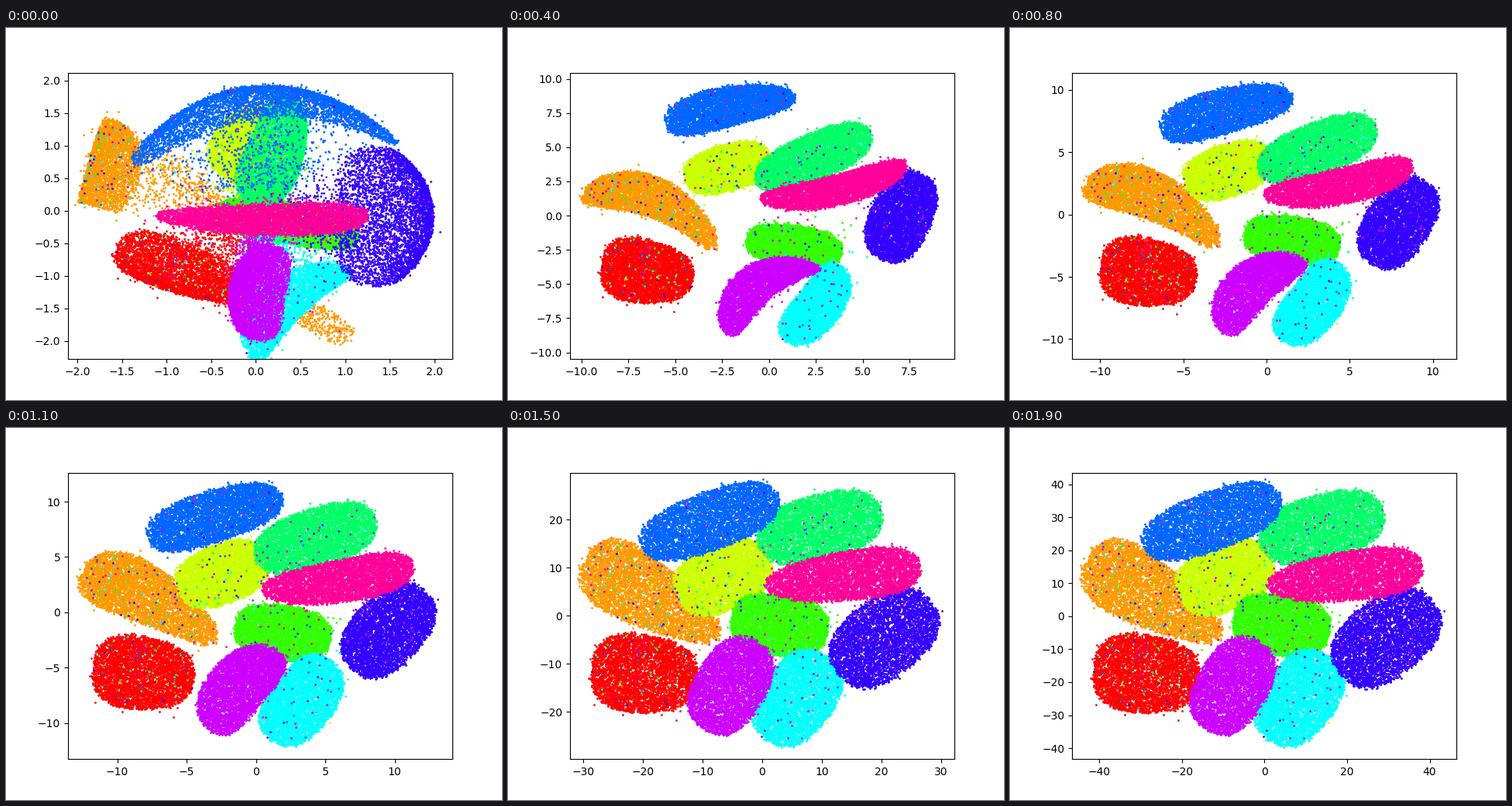
A matplotlib script for the animation above (2 s loop, 640 by 480 pixels).

```python
import colorsys

import matplotlib.pyplot as plt
import numpy as np
from matplotlib.animation import FuncAnimation

FRAMES, STEP = 20, 100
KEYS = np.array([0, 2, 4, 8, 11, 15, 19])
COUNT = 5000
LEFT, TOP, WIDE, HIGH = 80, 57.6, 496, 369.6
MIDDLE = np.array([322, 240])

rng = np.random.default_rng(7)


class Track:
    """Monotone cubic path through values given at KEYS."""

    def __init__(self, values):
        self.v = np.array(values, float).reshape(len(KEYS), -1)
        d = np.diff(self.v, axis=0) / np.diff(KEYS)[:, None]
        a, b = d[:-1], d[1:]
        same = a * b > 0
        mid = np.where(same, 2 * a * b / np.where(same, a + b, 1), 0)
        self.m = np.concatenate([d[:1], mid, d[-1:]])

    def at(self, frame):
        i = min(np.searchsorted(KEYS, frame, "right") - 1, len(KEYS) - 2)
        h = KEYS[i + 1] - KEYS[i]
        u = (frame - KEYS[i]) / h
        return ((1 + 2 * u) * (1 - u) ** 2 * self.v[i]
                + u * (1 - u) ** 2 * h * self.m[i]
                + u * u * (3 - 2 * u) * self.v[i + 1]
                + u * u * (u - 1) * h * self.m[i + 1])


class Pose:
    """Rotated oval on the stage that can bend and taper along its length."""

    def __init__(self, x, y, length, width, angle, bend=0, taper=0):
        self.center = np.array([x, y])
        self.length, self.width = length, width
        self.angle = np.radians(angle)
        self.bend, self.taper = bend, taper

    def place(self, u, v):
        a = self.length * u
        b = self.width * v * (1 + self.taper * u) + self.bend * u ** 2
        c, s = np.cos(self.angle), np.sin(self.angle)
        return self.center + np.column_stack([a * c - b * s, a * s + b * c])


def disc(n, taper=0):
    """Even points in a slightly squared disc, denser at the wider end."""
    u, v = rng.uniform(-1, 1, (2, 4 * n + 40))
    inside = np.abs(u) ** 2.5 + np.abs(v) ** 2.5 < 1
    even = rng.random(len(u)) * (1 + abs(taper)) < 1 + taper * u
    keep = np.flatnonzero(inside & even)[:n]
    return u[keep], v[keep]


class Cluster:
    def __init__(self, start, early, final, lobe=None):
        self.start, self.early, self.final, self.lobe = start, early, final, lobe

    def points(self, n):
        u, v = disc(n, self.final.taper)
        # The first cloud is packed against its outer rim
        pull = 1 + np.hypot(*(self.start.center - MIDDLE)) / 150
        first = self.start.place(u, 1 - 2 * ((1 - v) / 2) ** pull)
        if self.lobe:
            tail = u > 0.7
            first[tail] = self.lobe.place(*disc(tail.sum()))
        loose = (rng.random(n) < 0.13)[:, None]
        inward = rng.uniform(0, 0.75, (n, 1)) * (MIDDLE - first)
        first += loose * (inward + rng.normal(0, 8, (n, 2)))
        return np.stack([first, self.early.place(u, v), self.final.place(u, v)])


red = Cluster(Pose(230, 310, 92, 32, 20, -8, -0.2),
              Pose(181, 313, 56, 36, 10, 0, -0.2),
              Pose(176, 317, 69, 50, 5, 0, -0.1))
orange = Cluster(Pose(138, 188, 67, 33, 106),
                 Pose(194, 220, 90, 19, 18, 42),
                 Pose(186, 218, 100, 42, 31, 0, -0.4),
                 lobe=Pose(408, 380, 44, 18, 28))
yellow = Cluster(Pose(300, 145, 52, 32, -65, 0, -0.3),
                 Pose(285, 175, 54, 24, -12),
                 Pose(277, 192, 64, 43, -24))
green = Cluster(Pose(362, 250, 95, 27, 10),
                Pose(377, 293, 62, 21, 8),
                Pose(350, 254, 63, 40, 8))
spring = Cluster(Pose(347, 158, 74, 36, -70, -15, -0.2),
                 Pose(390, 183, 80, 25, -27),
                 Pose(402, 128, 82, 42, -15))
cyan = Cluster(Pose(362, 345, 85, 30, -37, 15, -0.4),
               Pose(411, 364, 57, 22, -53, -10),
               Pose(372, 348, 66, 47, -52))
blue = Cluster(Pose(328, 95, 172, -20, -5, 75, -0.3),
               Pose(297, 92, 82, -20, -8, 8, -0.4),
               Pose(260, 120, 94, -37, -20))
indigo = Cluster(Pose(490, 243, 90, 60, -90, -45),
                 Pose(516, 231, 60, 38, -80),
                 Pose(485, 270, 76, 50, -38))
violet = Cluster(Pose(325, 340, 62, -36, -80, 20),
                 Pose(343, 323, 80, -18, -27, 38, -0.5),
                 Pose(287, 332, 66, -45, -58))
pink = Cluster(Pose(330, 247, 137, 19, 0, -6, 0.3),
               Pose(418, 217, 95, 14, -16, -16),
               Pose(432, 191, 100, 31, -7, 0, 0.2))

clusters = [red, orange, yellow, green, spring, cyan, blue, indigo, violet, pink]
# Neighbours joined by a few stray dots
BRIDGES = [(cyan, indigo), (green, indigo), (indigo, pink), (yellow, orange),
           (pink, green), (yellow, spring), (violet, cyan)]


def class_points(own):
    parts = [own.points(COUNT)]
    for host in clusters:
        if host is not own:
            parts.append(host.points(14 if host is orange else 8))
    for a, b in BRIDGES:
        if a is own:
            u = rng.uniform(0, 0.7, (10, 1))
            parts.append(a.points(10) * (1 - u) + b.points(10) * u)
    p = np.concatenate(parts, axis=1)
    n = p.shape[1]
    halo = np.where(rng.random((n, 1)) < 0.035, 5, 1)
    return p + rng.normal(0, 1, (n, 2)) * halo


clouds = [class_points(c) for c in clusters]

# 0 first cloud, 1 tight clusters, 2 spread out
progress = Track([0, 1, 1.3, 1.5, 1.75, 2, 2])
# x min, x max, y min, y max
limits = Track([[-2.104, 2.2, -2.276, 2.118],
                [-8.16, 7.712, -8.49, 8.55],
                [-10.62, 9.9, -10.49, 10.45],
                [-11.7, 11.42, -11.6, 11.39],
                [-13.55, 14.16, -13.27, 12.62],
                [-32.2, 32.2, -29.8, 29.8],
                [-46.56, 46.47, -43.3, 43.5]])

fig, ax = plt.subplots(figsize=(6.4, 4.8), dpi=100)
dots = [ax.scatter([], [], s=1, linewidths=1,
                   color=[colorsys.hsv_to_rgb(c / 10, 1, 1)])
        for c in range(10)]


def draw(frame):
    x0, x1, y0, y1 = limits.at(frame)
    ax.set_xlim(x0, x1)
    ax.set_ylim(y0, y1)
    stage = progress.at(frame)[0]
    i = min(int(stage), 1)
    for dot, cloud in zip(dots, clouds):
        p = cloud[i] + (cloud[i + 1] - cloud[i]) * (stage - i)
        x = x0 + (p[:, 0] - LEFT) / WIDE * (x1 - x0)
        y = y1 - (p[:, 1] - TOP) / HIGH * (y1 - y0)
        dot.set_offsets(np.column_stack([x, y]))
    return dots


anim = FuncAnimation(fig, draw, frames=FRAMES, interval=STEP,
                     init_func=lambda: draw(0), repeat=True, repeat_delay=0)
plt.show()
```
